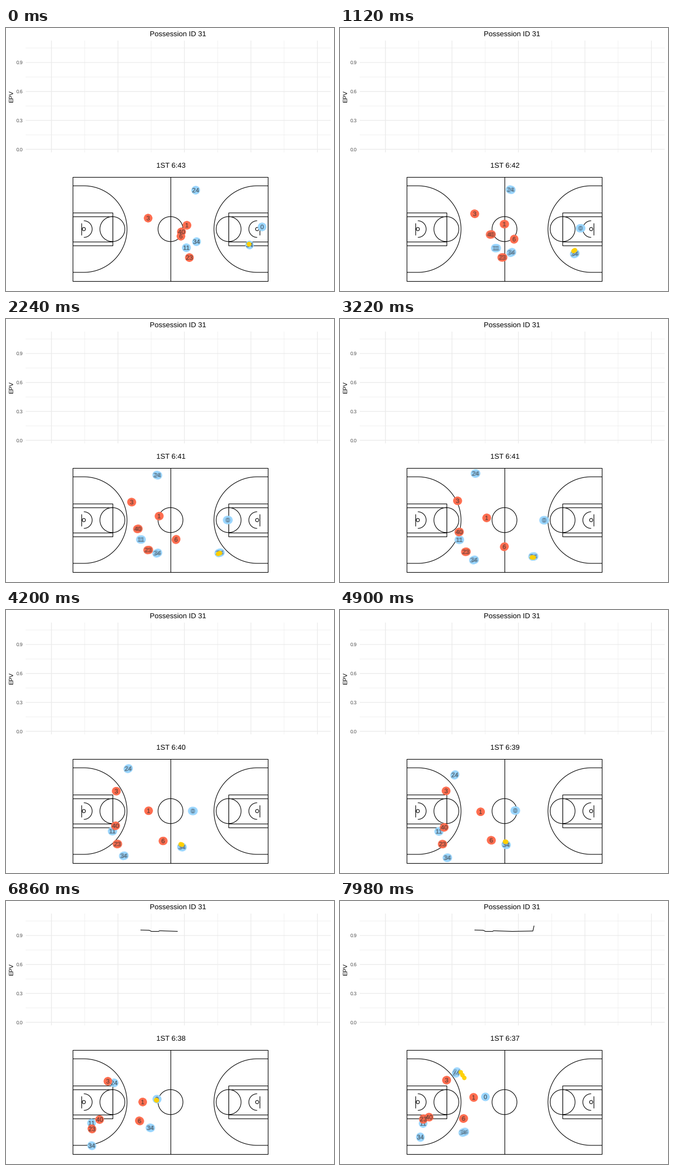
Recreate the animation shown at these times as a matplotlib script. Size 600x480 px, loop 8000 ms.

```python
import numpy as np
import matplotlib.pyplot as plt
from matplotlib.animation import FuncAnimation
from matplotlib.collections import LineCollection, PathCollection
from matplotlib.path import Path
from matplotlib.textpath import TextPath
from matplotlib.transforms import IdentityTransform

W, H, DPI = 600, 480, 100
PX = 72 / DPI            # points per pixel
TICK, STEP, LOOP = 20, 140, 8000
LAST = (LOOP - TICK) // STEP

plt.rcParams["font.family"] = "Liberation Sans"
plt.rcParams["text.hinting"] = "no_hinting"
fig = plt.figure(figsize=(W / DPI, H / DPI), dpi=DPI, facecolor="white")
ax = fig.add_axes([0, 0, 1, 1])
ax.set(xlim=(0, W), ylim=(H, 0))
ax.axis("off")


def label(x, y, s, size, color="black", **kw):
    return ax.text(x, y, s, fontsize=size * PX, color=color, va="baseline", **kw)


def strokes(segs, width, color="black", snap=None):
    lines = LineCollection(segs, colors=color, linewidths=width * PX, zorder=1)
    lines.set_snap(snap)
    ax.add_collection(lines, autolim=False)


# ---- chart grid and labels ----
X0, DX, Y0, DY = 83.2, 121.6, 63, 52.8


def grid(xs, ys, width):
    strokes([[(x, 23), (x, 227)] for x in xs]
            + [[(36, y), (594, y)] for y in ys], width, "#EBEBEB", False)


grid(X0 + DX * (np.arange(4) + 0.5), Y0 + DY * (np.arange(4) - 0.5), 0.7)
grid(X0 + DX * np.arange(5), Y0 + DY * np.arange(4), 1.3)
for k in range(4):
    label(31, Y0 + 3.3 + DY * k, f"{0.9 - 0.3 * k:.1f}", 8.8, "#4D4D4D", ha="right")
label(13.5, 124.5, "EPV", 11, ha="center", rotation=90, rotation_mode="anchor")
label(315, 15.2, "Possession ID 31", 13.2, ha="center")
clock = label(301.5, 255.2, "", 13.2, ha="center")

# ---- court, in feet from the centre ----
FT, CX, CY = 3.797, 300.9, 367


def line(*pts):
    return np.array(pts, float)


def rect(x0, x1, h):
    return line((x0, -h), (x1, -h), (x1, h), (x0, h), (x0, -h))


def arc(x, r, a=-180, b=180):
    t = np.radians(np.linspace(a, b, 91))
    return np.c_[x + r * np.cos(t), r * np.sin(t)]


HOOP = -41.75
three = np.vstack([line((-47, -20.8)), arc(HOOP, 20.8, -90, 90), line((-47, 20.8))])
half = [rect(-47, -28, 8), rect(-47, -28, 6), arc(-28, 6), three,
        arc(HOOP, 0.78), arc(HOOP, 4, -90, 90), line((-43, -3), (-43, 3))]
court = [rect(-47, 47, 25), line((0, -25), (0, 25)), arc(0, 6)]
court += half + [p * (-1, 1) for p in half]
strokes([p * FT + (CX, CY) for p in court], 1.1)


# ---- players: smooth curves through a few evenly timed waypoints ----
def smooth(*pts):
    t = np.linspace(0, LAST, len(pts))
    return np.poly1d(np.polyfit(t, pts, len(pts) - 1))


class Player:
    def __init__(self, num, xs, ys):
        self.num, self.x, self.y = num, smooth(*xs), smooth(*ys)

    def at(self, t):
        return np.array([self.x(t), self.y(t)])


guard = Player("0", (468.5, 392, 309, 266), (363, 367, 357.5))
wing = Player("24", (347, 264, 204, 213), (296, 287, 287, 322, 313))
starter = Player("34", (445.5, 400, 328, 282, 226.5), (396, 424, 433.5, 419, 422))
blue = [
    wing, guard, starter,
    Player("34", (348.5, 263, 186, 147), (390, 433, 453, 431)),
    Player("11", (330, 234, 174, 152), (401, 406)),
]
red = [
    Player("3", (260, 223.5, 190.5, 195), (347, 333, 330, 327)),
    Player("1", (331, 274.5, 255.5, 244.5), (360, 361, 369, 358.5)),
    Player("6", (320, 307, 270, 226), (380, 398.5, 421, 411, 397)),
    Player("40", (321, 230.5, 185.5, 163), (372, 385.5, 398, 394.5)),
    Player("23", (335.5, 247, 179, 152.5), (419, 423, 426.5, 398)),
]


def ball_at(t):
    """Carried with a slow bob, passed twice in a straight line."""
    first = np.interp(t, (39, 43.6), (0, 1))
    second = np.interp(t, (53.6, 58), (0, 1))
    pos = starter.at(t) * (1 - first) + guard.at(t) * first
    pos = pos * (1 - second) + wing.at(t) * second
    return pos - (1, 1.5 + 4.5 * np.sin(0.2375 * t))


def digits(s):
    p = TextPath((0, 0), s, size=11.5)
    box = p.get_extents()
    mid = ((box.x0 + box.x1) / 2, (box.y0 + box.y1) / 2)
    return Path(p.vertices - mid, p.codes)


def stamps(paths, color, alpha):
    c = PathCollection(paths, facecolors=color, edgecolors="none", alpha=alpha,
                       offsets=np.zeros((1, 2)), offset_transform=ax.transData,
                       transform=IdentityTransform(), zorder=3)
    ax.add_collection(c, autolim=False)
    return c


def disc(r):
    return [Path.circle((0, 0), r)]


def team(players, color):
    dots = stamps(disc(7.6), color, 0.88)
    nums = stamps([digits(p.num) for p in players], "#303030", 0.4)
    return players, dots, nums


teams = [team(blue, "#9AD6FF"), team(red, "#FF6E50")]
ball = stamps(disc(4.1), "#FFD000", 0.95)

# ---- EPV curve ----
epv_x, epv_y = np.array([
    (246, 53), (262, 53.4), (266, 55.5), (279, 55.5),
    (281, 54.3), (315, 55.5), (352.8, 54.8), (355, 45)]).T
curve, = ax.plot([], [], color="black", lw=1.1 * PX, solid_capstyle="butt")


def update(i):
    n = i * TICK // STEP
    # three tracking samples overlap, bunched together at the start
    times = n + np.array([-1, 0, 1]) * (1 / 3 if n else 0.1)
    for players, dots, nums in teams:
        pos = [p.at(t) for t in times for p in players]
        dots.set_offsets(pos)
        nums.set_offsets(pos)
    ball.set_offsets([ball_at(t) for t in times])

    end = np.clip(273 + 5.125 * (n - 41), epv_x[0], epv_x[-1])
    xs = np.append(epv_x[epv_x < end], end)
    curve.set_data(xs, np.interp(xs, epv_x, epv_y))

    clock.set_text(f"1ST 6:{43 - int((n + 1.7) / 8.55)}")
    return [curve, clock, ball]


anim = FuncAnimation(fig, update, frames=LOOP // TICK, interval=TICK,
                     repeat=True, repeat_delay=0, blit=False)
plt.show()
```
